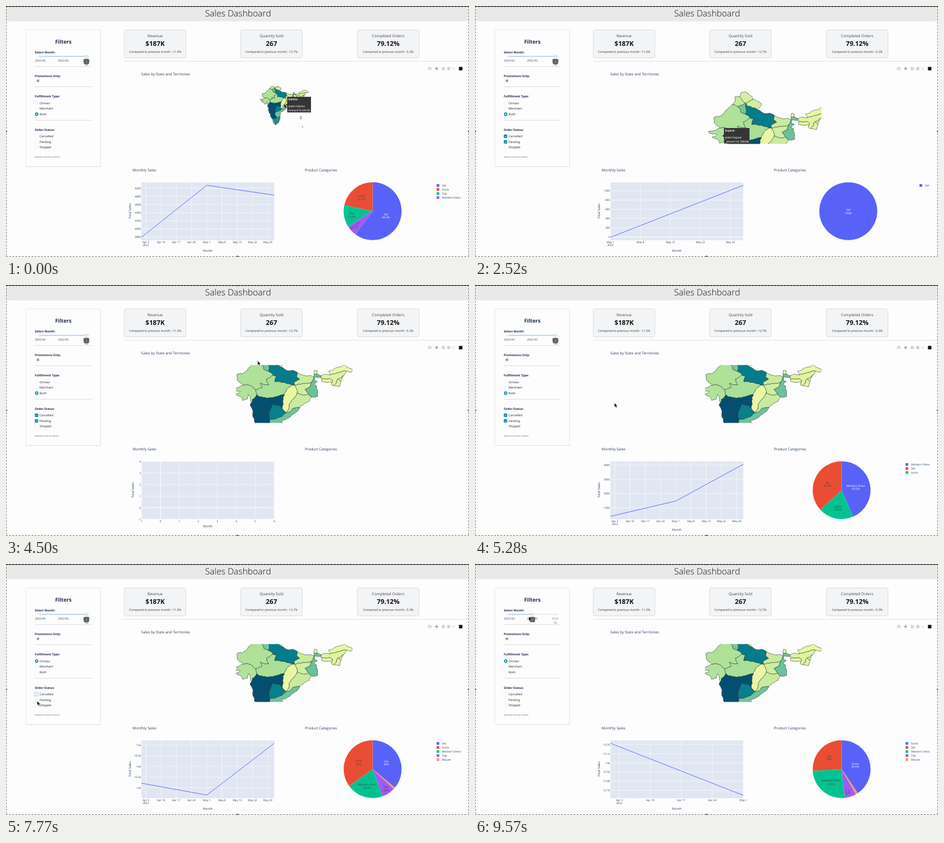
These frames come from a looping animation (800x434 px, 9600 ms). An HTML page:

```html
<!DOCTYPE html>
<html lang="en">
<head>
<meta charset="utf-8">
<title>Sales Dashboard</title>
<style>
html, body { margin: 0; width: 100%; height: 100%; overflow: hidden; background: #fdfdfd; }
svg { display: block; width: 100vw; height: 100vh; font-family: "Open Sans", sans-serif; text-rendering: geometricPrecision; }
.land path { stroke: #26302c; stroke-width: .55; stroke-linejoin: round; vector-effect: non-scaling-stroke; }
</style>
</head>
<body>
<svg id="stage" viewBox="0 0 800 434" xmlns="http://www.w3.org/2000/svg"></svg>
<script>
const LOOP = 9600;
const NAVY = '#2a3f5f', TEAL = '#0583a6';
const COLORS = ['#5862f9', '#ea4d33', '#02c38f', '#a259f7', '#f79a55'];

const text = (x, y, s, size, fill = NAVY, extra = '') =>
  `<text x="${x}" y="${y}" font-size="${size}" fill="${fill}" ${extra}>${s}</text>`;
const rect = (x, y, w, h, fill, extra = '') =>
  `<rect x="${x}" y="${y}" width="${w}" height="${h}" fill="${fill}" ${extra}/>`;
const line = (x1, y1, x2, y2, stroke, w = .6, extra = '') =>
  `<path d="M${x1} ${y1}L${x2} ${y2}" stroke="${stroke}" stroke-width="${w}" fill="none" ${extra}/>`;
const circle = (x, y, r, fill, extra = '') => `<circle cx="${x}" cy="${y}" r="${r}" fill="${fill}" ${extra}/>`;
const MID = 'text-anchor="middle"', BOLD = 'font-weight="700"';

// Map: outlines in longitude/latitude, edges roughened the same way on both sides
const noise = n => { const s = Math.sin(n) * 4375.85; return s - Math.floor(s) - .5; };
function rough(a, b, depth) {
  const d = Math.hypot(a[0] - b[0], a[1] - b[1]);
  if (!depth || d < .35) return [a];
  const sx = a[0] + b[0], sy = a[1] + b[1], w = d * .26;
  const m = [sx / 2 + noise(sx * 12.9 + sy * 78.2) * w, sy / 2 + noise(sx * 39.3 + sy * 11.1) * w];
  return [...rough(a, m, depth - 1), ...rough(m, b, depth - 1)];
}
function state(fill, outline) {
  const pts = outline.split('|').map(p => p.split(' ').map(Number));
  const all = pts.flatMap((p, i) => rough(p, pts[(i + 1) % pts.length], 3));
  const d = all.map(p => `${(p[0] - 68.2).toFixed(2)} ${(33.2 - p[1]).toFixed(2)}`).join('L');
  return `<path d="M${d}Z" fill="${fill}"/>`;
}
const land = () => [
  state('#b1e29b', '68.2 23.6|71 24.4|72.6 24.4|74 23.3|74.3 22.1|73.8 21.4|73 20.2|72.7 21.3|72.3 22.2|72.1 21.1|70.9 20.7|69 22.2|70.3 22.9|68.5 23.1'),
  state('#afe198', '71 24.4|69.6 26|69.5 27|71.9 27.9|73.9 30|75.3 29.6|76 28.2|77 27.8|78.2 26.8|76.6 25.9|77.2 24.5|75.2 24.9|75.6 23.9|74 23.3|72.6 24.4'),
  state('#a9df98', '78.2 26.8|79 26.7|78.6 25.3|80.8 25.1|82.8 24.4|81.7 23.6|80.9 22.1|79 21.6|76.8 21.3|75 21.6|74.3 22.1|74 23.3|75.6 23.9|75.2 24.9|77.2 24.5|76.6 25.9'),
  state('#057c8a', '77.1 30.4|77.7 29.7|78.9 29.3|80.1 28.8|82 27.9|84.1 27.4|83.9 26.4|84.6 25.8|83.4 25.2|83.4 24.4|82.8 24.4|80.8 25.1|78.6 25.3|79 26.7|78.2 26.8|77 27.8|77.3 28.8'),
  state('#d3efa1', '77.1 30.4|78.9 31.3|81 30.2|80.1 28.8|78.9 29.3|77.7 29.7'),
  state('#d6f0a2', '77.1 30.4|76.4 31|75.7 32|76 32.9|77 33.2|77.9 32.6|78.7 32|78.9 31.3'),
  state('#c5ea9e', '73.9 30|74.6 31.1|74.5 31.9|75.7 32|76.4 31|77.1 30.4|76.2 29.9|75.3 29.6'),
  state('#76c69c', '75.3 29.6|76.2 29.9|77.1 30.4|77.3 28.8|77 27.8|76 28.2'),
  state('#c9eb9e', '84.1 27.4|86 26.7|88.1 26.5|87.6 25.2|85.8 24.8|84 24.5|83.4 24.4|83.4 25.2|84.6 25.8|83.9 26.4'),
  state('#d0ee9f', '83.4 24.4|84 24.5|85.8 24.8|87.6 25.2|87.2 24|85.9 23.4|86.8 22.3|85.2 22.1|84 22.5|83.9 23.5'),
  state('#6cc09a', '87.6 25.2|88.1 26.5|88.1 27.1|89.8 26.7|89.7 26.2|88.4 26.4|88.2 25.5|88.9 25.2|88.1 24.6|88.7 24.2|88.9 23|89 21.7|87.5 21.6|86.8 22.3|85.9 23.4|87.2 24'),
  state('#e6f6a4', '88.1 27.1|88.2 28|88.8 27.9|88.8 27.1'),
  state('#e9f7a3', '82.8 24.4|83.4 24.4|83.9 23.5|84 22.5|83.4 21.4|82.4 20.2|82 18.6|81.4 17.8|80.4 18.8|80.5 20.5|80.9 22.1|81.7 23.6'),
  state('#c9eb9f', '84 22.5|85.2 22.1|86.8 22.3|87.5 21.6|86.9 20.5|85.2 19.5|84.7 19.1|83.4 18.9|81.4 17.8|82 18.6|82.4 20.2|83.4 21.4'),
  state('#044f70', '73.8 21.4|74.3 22.1|75 21.6|76.8 21.3|79 21.6|80.9 22.1|80.5 20.5|80.4 18.8|79.9 19.4|78.3 19.8|77.5 18.4|76 17.4|74.4 16.2|73.7 15.7|73.3 17|72.7 19.5|73 20.2'),
  state('#077f8c', '80.4 18.8|81.4 17.8|80.3 16.8|78.9 16.3|77.4 16.1|77.5 18.4|78.3 19.8|79.9 19.4'),
  state('#70c29c', '81.4 17.8|83.4 18.9|84.7 19.1|82.3 16.7|80.3 15.8|80.2 13.5|78.2 12.8|77 14.8|77.4 16.1|78.9 16.3|80.3 16.8'),
  state('#044f70', '77.5 18.4|77.4 16.1|77 14.8|78.2 12.8|76.7 11.7|75.8 11.9|74.9 12.8|74.4 14.8|73.7 15.7|74.4 16.2|76 17.4'),
  state('#6cc09a', '74.9 12.8|75.8 11.9|76.7 11.7|76.9 10.2|77.3 9.4|77.3 8.4|76.5 9|75.8 11.2'),
  state('#1f8f94', '76.7 11.7|78.2 12.8|80.2 13.5|79.8 11|79 9.3|77.6 8.1|77.3 8.4|77.3 9.4|76.9 10.2'),
  state('#dff4a2', '89.8 26.7|92 26.9|94 27.5|95.9 27.8|95.2 26.7|93.8 25.9|92.8 24.3|92.2 24.6|92.6 25.5|91.8 26|89.9 25.9'),
  state('#e6f6a4', '89.9 25.9|91.8 26|92.6 25.5|92.4 25|89.9 25.3'),
  state('#e9f8a3', '92 26.9|91.6 27.8|93.4 28.6|95.5 29.4|97.4 28.2|97 27.5|95.9 27.8|94 27.5'),
  state('#e9f8a3', '95.2 26.7|94.6 25.3|93.8 25.9'),
  state('#e0f4a2', '93.8 25.9|94.6 25.3|94.2 24|93.1 24.2|92.8 24.3'),
  state('#e9f8a3', '92.8 13.6|93 12.9|92.8 11.6|92.6 12.4'),
  state('#e9f8a3', '93.6 7.4|93.9 7.2|93.8 6.8')
].join('');

// Fixed page parts
function kpi(x, title, value, change) {
  const c = x + 53.3;
  return rect(x, 41.3, 106.6, 48.4, '#f3f4f6', 'rx="3" stroke="#cfd1d4" stroke-width=".7"') +
    text(c, 54, title, 6.5, '#444', MID) + text(c, 69.2, value, 11.3, '#111', MID + ' ' + BOLD) +
    text(c, 81.2, 'Compared to previous month: ' + change, 5.2, '#333', MID);
}
const page = () =>
  rect(0, 0, 800, 434, '#fdfdfd') + rect(0, 0, 800, 26.5, '#e9e9e9') +
  text(401, 18, 'Sales Dashboard', 15.1, '#111', MID + ' font-weight="300"') +
  rect(34.8, 42.2, 129, 236, '#e3e3e3', 'rx="1.5"') +
  rect(34.3, 41.3, 129, 236, '#fdfdfd', 'rx="1.5" stroke="#dcdcdc" stroke-width=".6"') +
  text(99, 65, 'Filters', 9, '#1b2a49', MID + ' ' + BOLD) +
  [['Select Month:', 82.3], ['Promotions Only:', 122.6], ['Fulfillment Type:', 157.6], ['Order Status:', 215.6]]
    .map(([s, y]) => text(49.7, y, s, 5.2, '#1b2a49', BOLD)).join('') +
  [104.7, 139.6, 197.6].map(y => line(49.7, y, 148.5, y, '#c8c8c8')).join('') +
  rect(50.5, 126, 11.5, 6.4, '#fff', 'rx="3.2" stroke="#ececec" stroke-width=".5"') + circle(55.2, 129.2, 2.3, '#9a9a9a') +
  [['Ormavi', 169.6], ['Merchant', 179.2], ['Both', 188.7], ['Cancelled', 227.3], ['Pending', 237], ['Shipped', 246.4]]
    .map(([s, y]) => text(58, y, s, 5.25, '#222')).join('') +
  kpi(204.3, 'Revenue', '$187K', '-11.0%') + kpi(405.4, 'Quantity Sold', '267', '-12.7%') +
  kpi(607, 'Completed Orders', '79.12%', '-5.3%') +
  line(204, 95.6, 800, 95.6, '#cfcfcf') +
  text(233.8, 120.2, 'Sales by State and Territories', 6.28) +
  text(218.8, 286.4, 'Monthly Sales', 6.3) + text(516.2, 286.4, 'Product Categories', 6.3) + modebar() + frame();
function modebar() {
  const sign = (x, plus) => rect(x - 2.5, 105.7, 5, 5, '#c4c6ca') + line(x - 1.5, 108.2, x + 1.5, 108.2, '#fff', .7) +
    (plus ? line(x, 106.7, x, 109.7, '#fff', .7) : '');
  return rect(729.4, 106.2, 5.6, 4.4, '#c4c6ca', 'rx=".7"') + rect(731, 105.4, 2.4, 1.4, '#c4c6ca') + circle(732.2, 108.4, 1.3, '#fdfdfd') +
    line(741, 108.2, 747, 108.2, '#777b82', 1) + line(744, 105.2, 744, 111.2, '#777b82', 1) +
    sign(755.6, true) + sign(765, false) +
    line(771, 105.7, 776, 110.7, '#c9cbcf', .8) + line(776, 105.7, 771, 110.7, '#c9cbcf', .8) +
    rect(782.6, 105.3, 6, 6, '#111');
}
function frame() {
  const dash = 'stroke-dasharray="3 2.5"';
  return rect(0, 0, 800, 1.3, '#555') + line(0, .6, 800, .6, '#111', 1.2, dash) +
    line(.4, 0, .4, 434, '#444', .8, dash) + line(799.6, 0, 799.6, 434, '#444', .8, dash) +
    line(0, 433.5, 800, 433.5, '#444', .8, dash) +
    [[400, 433], [400, .8], [.6, 217], [799.4, 217]].map(([x, y]) => circle(x, y, 1.3, '#888', 'stroke="#333" stroke-width=".4"')).join('');
}

// Charts. y: first value, step, count, first pixel, pixel step. slices: name, percent, label, x, y, [angle, size]
const CHARTS = [
  { at: 0, rows: 13, days: [0, 61], y: [3800, 200, 7, 399.5, -14.08], pts: '234 400L347 310L463.5 327', cx: 633.5, key: 744,
    slices: [['Set', 60.2, '60.2%', 656.5, 361.5], ['kurta', 21.7, '21.7%', 614, 330], ['Top', 12.3, '12.3%', 597, 360],
      ['Western Dress', 5.8, '5.8%', 604, 380.5, -38, 3.3]] },
  { at: 900, rows: 2, days: [0, 30], y: [400, 200, 5, 388, -19.65], pts: '234 400L463.5 310', cx: 643, key: 764,
    slices: [['Set', 81, '81%', 656.5, 374.5], ['kurta', 19, '19%', 624.5, 327.5]] },
  { at: 2380, rows: 2, days: [30, 61], y: [0, 200, 6, 399.5, -16], pts: '234 400L463.5 310', cx: 645, key: 768,
    slices: [['Set', 100, '100%', 645, 354]] },
  { at: 3400, rows: 0, y: [-1, 1, 6, 405, -20], slices: [] },
  { at: 4650, rows: 14, days: [0, 61], y: [1000, 1000, 4, 385, -24.6], pts: '234 400L347 373.5L463.5 310', cx: 633.5, key: 744,
    slices: [['Western Dress', 43.5, '43.5%', 658, 348.5], ['Set', 36.9, '36.9%', 609, 343.5], ['kurta', 19.6, '19.6%', 627, 384.5]] },
  { at: 7350, rows: 70, days: [0, 61], y: [13000, 500, 5, 386.8, -18.35], pts: '234 379L347 399.5L463.5 310', cx: 633.5, key: 744,
    slices: [['Set', 36, '36%', 657, 342.5], ['kurta', 35, '35%', 609.5, 342], ['Western Dress', 20.7, '20.7%', 624, 383],
      ['Top', 7.3, '7.33%', 655.5, 387], ['Blouse', 1]] },
  { at: 9000, rows: 48, days: [0, 30], y: [12700, 100, 6, 391.4, -15.85], pts: '234 310L463.5 400', cx: 633.5, key: 744,
    slices: [['kurta', 40.6, '40.6%', 657, 346.5], ['Set', 26, '26%', 612, 333.5], ['Western Dress', 25.8, '25.8%', 615, 376],
      ['Top', 6.4, '6.4%', 645, 394, 72, 4.2], ['Blouse', 1.2]] }
];
const dateName = d => d < 30 ? 'Apr ' + (d + 1) : 'May ' + (d - 29);
const num = v => v >= 10000 ? +(v / 1000).toFixed(1) + 'k' : v;

function lineChart({ days, y, pts }) {
  const [L, R, T, B] = [234, 463.5, 305, 405];
  let out = rect(L, T, R - L, B - T, '#e1e7f2'), labels = '';
  for (let i = 0; i < y[2]; i++) {
    const v = y[0] + i * y[1], py = y[3] + i * y[4];
    out += line(L, py, R, py, '#fff', v ? .55 : 1);
    labels += text(233.2, py + 1.7, num(v), 4.7, NAVY, 'text-anchor="end"');
  }
  const ticks = days
    ? Array.from({ length: 9 }, (_, i) => 2 + 7 * i).filter(d => d >= days[0] && d <= days[1])
    : [-1, 0, 1, 2, 3, 4, 5, 6];
  const [a, b] = days || [-1, 6];
  ticks.forEach((d, i) => {
    const x = L + (d - a) / (b - a) * (R - L);
    out += line(x, T, x, B, '#fff', !days && !d ? 1 : .55);
    labels += text(x, 409.8, days ? dateName(d) : d, 4.7, NAVY, MID);
    if (days && !i) labels += text(x, 415, '2022', 4.7, NAVY, MID);
  });
  if (pts) out += `<path d="M${pts}" fill="none" stroke="#636efa" stroke-width="1"/>`;
  const tx = days ? 215.8 : 220.8;
  return out + labels + text(348.6, days ? 425 : 419.3, 'Month', 5.35, NAVY, MID) +
    text(tx, 354.5, 'Total Sales', 5.4, NAVY, `${MID} transform="rotate(-90 ${tx} 354.5)"`);
}

function pie({ slices, cx, key }) {
  const cy = 354.7, r = 50;
  const at = p => `${cx + r * Math.sin(p * Math.PI / 50)} ${cy - r * Math.cos(p * Math.PI / 50)}`;
  let out = '', labels = '', end = 100;
  // The first slice runs clockwise from the top, the others anticlockwise
  slices.forEach(([name, pct, label, x, y, turn = 0, size = 4.75], i) => {
    const from = i ? end - pct : 0, to = i ? end : pct;
    if (i) end = from;
    out += pct === 100 ? circle(cx, cy, r, COLORS[i])
      : `<path d="M${cx} ${cy}L${at(from)}A${r} ${r} 0 ${pct > 50 ? 1 : 0} 1 ${at(to)}Z" fill="${COLORS[i]}"/>`;
    if (label) {
      const ink = i ? '#444' : '#fff';
      labels += `<g transform="translate(${x} ${y}) rotate(${turn})">` +
        text(0, 0, name, size, ink, MID) + text(0, size * 1.2, label, size, ink, MID) + '</g>';
    }
    const ly = 310.3 + 7 * i;
    labels += rect(key, ly - 2.3, 4.6, 4.6, COLORS[i]) + text(key + 9.6, ly + 1.7, name, 4.75);
  });
  return out + labels;
}

// Filter panel
const radio = (y, on) => on
  ? circle(53, y, 2.9, TEAL) + circle(53, y, 1.2, '#fff')
  : circle(53, y, 2.7, '#fff', 'stroke="#e3e6e8" stroke-width=".5"');
const check = (y, on, focus) =>
  (focus ? rect(49.2, y - 3.5, 7, 7, '#b9cff2', 'rx="1.2"') : '') +
  rect(50, y - 2.7, 5.4, 5.4, on ? TEAL : '#fff', `rx=".8" stroke="${on ? TEAL : focus ? '#8fb2e6' : '#e3e6e8'}" stroke-width=".5"`) +
  (on ? `<path d="M51.3 ${y}l1.1 1.2 1.9-2.3" fill="none" stroke="#fff" stroke-width=".8"/>` : '');
const within = (t, a, b) => t >= a && t < b;

function panel(t, chart) {
  const may = t >= 9000, x = may ? 99 : 139;
  const dim = may ? '#777' : '#444';
  return line(54, 87.2, 144, 87.2, '#e4e4e4', 1.2) + line(59, 87.2, x, 87.2, '#a3cfe6', 1.2) +
    [59, 99, 139].map(c => circle(c, 87.2, 1.3, '#fff', `stroke="${c > x ? '#ddd' : '#a3cfe6'}" stroke-width=".6"`)).join('') +
    circle(x, 87.2, 2.2, '#fff', 'stroke="#8fc4e0" stroke-width=".8"') +
    text(59, 96.4, '2022-04', 4.8, '#333', MID) + text(99, 96.4, '2022-05', 4.8, '#333', MID) +
    text(139, 96.4, '2022-', 4.8, dim, MID) + text(139, 102.6, '06', 4.8, dim, MID) +
    rect(x - 4.6, 91.4, 9.2, 9, '#5a5a5a', 'rx="1.6"') + text(x, 97.6, may ? 1 : 2, 4.8, '#fff', MID) +
    radio(167.8, t >= 6100) + radio(177.4, false) + radio(186.9, t < 6100) +
    check(225.2, within(t, 660, 7300), within(t, 660, 850) || within(t, 7300, 8600)) +
    check(234.9, within(t, 850, 6850), within(t, 850, 1800) || within(t, 6850, 7300)) +
    check(244.4, false, false) +
    text(49.7, 261.6, `Showing ${chart.rows} records up to 2022-0${may ? 5 : 6}`, 2.7, '#222');
}

// Hover labels: from, to, box, name, amount
const TIPS = [
  [0, 300, 486, 157, 41, 'Odisha', '9,329.95'],
  [2380, 2800, 430, 211, 44.3, 'Gujarat', '12.78628k'],
  [3450, 4120, 472, 144.4, 55, 'Himachal Pradesh', '5474']
];
function hover(t) {
  const tip = TIPS.find(([a, b]) => within(t, a, b));
  if (!tip) return '';
  const [, , x, y, w, name, amount] = tip;
  const row = (dy, s, extra) => text(x + 1.7, y + dy, s, 4.8, '#fff', `font-family="Liberation Sans, sans-serif" ${extra}`);
  return rect(x, y, w, 27, '#353535') + `<path d="M${x} ${y + 11.5}l-3 2 3 2z" fill="#353535"/>` +
    row(6, name, BOLD) + row(18.2, 'state=' + name, '') + row(24.8, 'Amount=' + amount, '');
}

// Motion tracks: time followed by values
const VIEW = [[0, 439, 134, 2.87], [1230, 439, 134, 2.87], [1440, 445, 142, 2.22], [1600, 445, 142, 2.22],
  [2100, 403.5, 148, 7.17], [4150, 403.5, 148, 7.17], [4450, 389.7, 110.2, 7.17]];
const POINTER = [[0, 480.5, 169], [250, 480.5, 169], [600, 53, 225], [700, 53, 225], [800, 53, 235], [950, 53, 235],
  [1250, 480.5, 172.5], [1650, 480.5, 172.5], [2000, 470, 190], [2360, 431, 230], [2750, 431, 230], [3450, 456, 166.5],
  [4150, 456, 166.5], [4450, 442, 128.5], [4900, 241, 204], [5550, 241, 204], [6000, 53, 167], [6500, 53, 167],
  [6800, 53, 234], [6900, 53, 234], [7150, 53, 225], [7500, 53, 225], [7700, 54, 237], [7900, 54, 237],
  [8500, 139, 88], [8750, 139, 88], [9200, 95, 90.5], [9550, 93, 91]];
function follow(track, t) {
  const i = track.findIndex(k => k[0] > t);
  if (i < 0) return track[track.length - 1].slice(1);
  const a = track[i - 1], b = track[i], u = (t - a[0]) / (b[0] - a[0]), e = u * u * (3 - 2 * u);
  return a.slice(1).map((v, j) => v + (b[j + 1] - v) * e);
}

const stage = document.getElementById('stage');
stage.innerHTML = `<defs><clipPath id="geo"><rect x="397.5" y="138.4" width="201" height="100"/></clipPath></defs>` +
  page() + '<g id="panel"></g><g id="charts"></g>' +
  `<g clip-path="url(#geo)"><g id="map" class="land">${land()}</g></g><g id="hover"></g>` +
  '<path id="pointer" d="M0 0v7.2l1.7-1.5 1.2 2.7 1.3-.6-1.2-2.6h2.3z" fill="#000" stroke="#fff" stroke-width=".45"/>';
const el = id => document.getElementById(id);
const parts = { panel: el('panel'), charts: el('charts'), hover: el('hover') };
const map = el('map'), pointer = el('pointer');
const shown = {};
function put(id, html) {
  if (shown[id] !== html) parts[id].innerHTML = shown[id] = html;
}
CHARTS.forEach(c => { c.html = lineChart(c) + pie(c); });

function draw(t) {
  const chart = CHARTS.filter(c => c.at <= t).pop();
  put('panel', panel(t, chart));
  put('charts', chart.html);
  put('hover', hover(t));
  const [x, y, k] = follow(VIEW, t);
  map.setAttribute('transform', `translate(${x} ${y}) scale(${k})`);
  pointer.setAttribute('transform', `translate(${follow(POINTER, t).join(' ')})`);
}
const start = performance.now();
function tick() {
  draw((performance.now() - start) % LOOP);
  requestAnimationFrame(tick);
}
draw(0);
requestAnimationFrame(tick);
</script>
</body>
</html>
```
